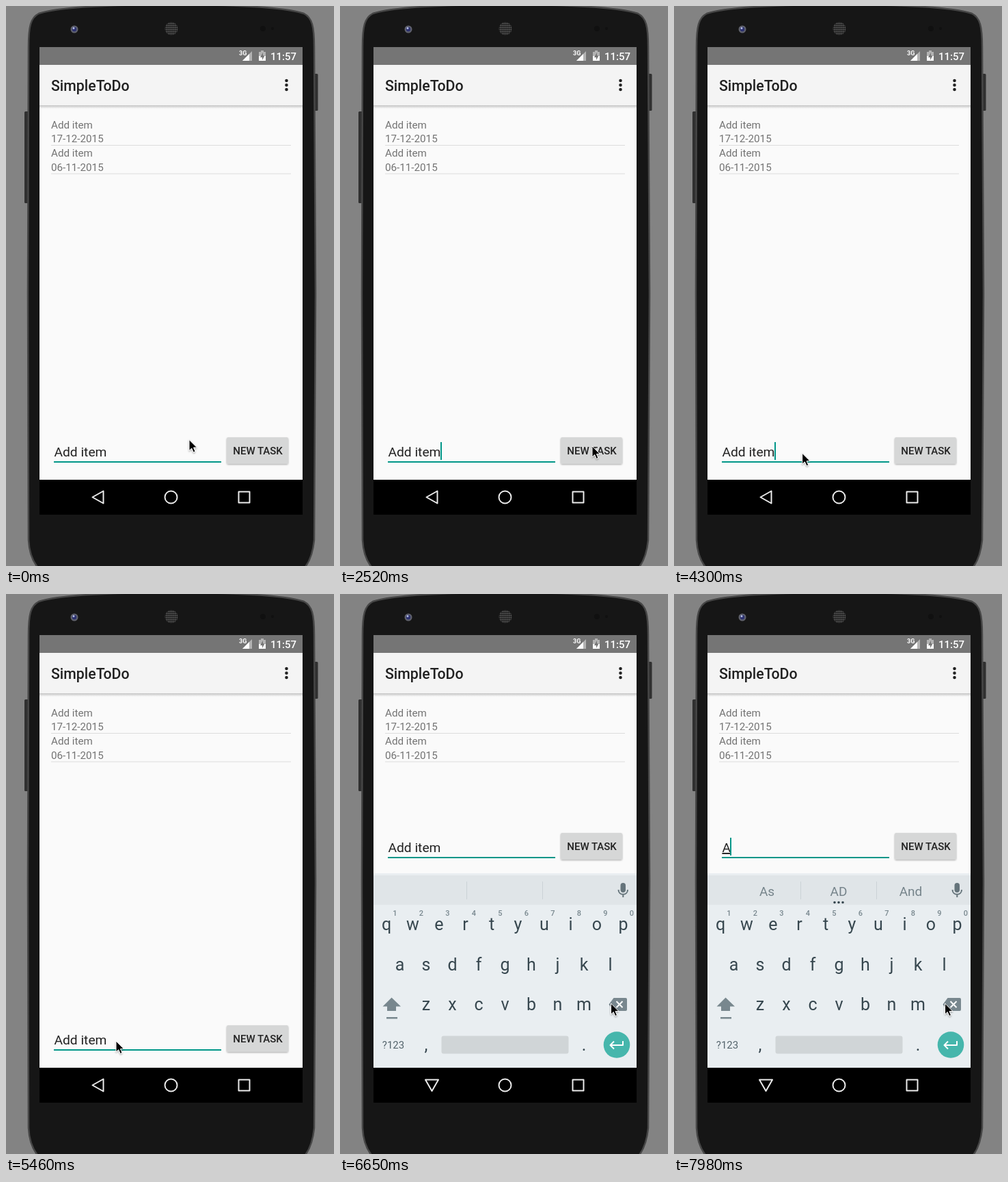
An HTML page for the animation above (8000 ms loop, 480x818 px).

```html
<!DOCTYPE html>
<html lang="en">
<head>
<meta charset="utf-8">
<title>To-do app</title>
<style>
html, body { margin: 0; width: 100%; height: 100%; overflow: hidden; background: #838383; }
svg { display: block; font-family: Roboto, sans-serif; }
text { white-space: pre; }
.medium { font-weight: 500; }
.mid { text-anchor: middle; }
.line { fill: none; stroke-width: 2; stroke-linejoin: round; }
</style>
</head>
<body>
<svg width="480" height="818" viewBox="0 0 480 818">
  <defs>
    <pattern id="mesh" width="3" height="3" patternUnits="userSpaceOnUse">
      <rect width="3" height="3" fill="#1d1d1d"/><circle cx="1.5" cy="1.5" r="1.1" fill="#606060"/>
    </pattern>
    <linearGradient id="fade" x2="0" y2="1">
      <stop stop-color="#c4c4c4"/><stop offset="1" stop-color="#fafafa"/>
    </linearGradient>
    <filter id="soft" x="-30%" y="-30%" width="160%" height="180%">
      <feDropShadow dx="0" dy="1.3" stdDeviation="1" flood-opacity=".35"/>
    </filter>
  </defs>

  <!-- Phone -->
  <rect x="27" y="154" width="7" height="134" rx="1.5" fill="#303030"/>
  <rect x="450" y="99" width="6.5" height="54" rx="1.5" fill="#303030"/>
  <path d="M33 60C33 30 36 17 48 11C70 4 130-2 242-2S414 4 436 11C448 17 451 30 451 60L453 420 451 780C449 800 444 814 434 824H50C40 814 34 800 33 780L32 420Z" fill="#161616" stroke="#464646" stroke-width="2.5"/>
  <circle cx="100" cy="34" r="5.5" fill="#5f616c"/>
  <circle cx="100" cy="34" r="3.2" fill="#2d3270"/>
  <circle cx="99" cy="32.5" r="1.4" fill="#b9c2ea"/>
  <circle cx="242" cy="33" r="9.5" fill="url(#mesh)"/>
  <circle cx="376" cy="33" r="4" fill="#101010"/>
  <circle cx="390" cy="33" r="2" fill="#101010"/>

  <!-- App -->
  <rect x="49" y="60" width="385" height="632" fill="#fafafa"/>
  <rect x="49" y="145" width="385" height="5" fill="url(#fade)"/>
  <rect x="49" y="86" width="385" height="59" fill="#f4f4f4"/>
  <rect x="49" y="60" width="385" height="26" fill="#757575"/>
  <g fill="#fff">
    <text x="341" y="72" font-size="9" font-weight="700">3G</text>
    <path d="M360 66V80H346Z" fill-opacity=".45"/>
    <path d="M356 70V80H346Z"/>
    <path d="M370 67H373V65H377V67H380V80H370Z" fill-opacity=".45"/>
    <path d="M370 73H380V80H370Z"/>
    <path d="M376 68L372 75H375V79L378.5 72.5H376Z" fill="#757575"/>
    <text x="387" y="78.5" font-size="15" class="medium">11:57</text>
  </g>
  <text x="66" y="124" font-size="21.3" class="medium" fill="#212121">SimpleToDo</text>
  <path d="M410.5 109v0m0 6.5v0m0 6.5v0" stroke="#212121" stroke-width="4.6" stroke-linecap="round"/>
  <g font-size="15.2" fill="#737373">
    <text x="66" y="178.5">Add item</text><text x="66" y="199">17-12-2015</text>
    <text x="66" y="220">Add item</text><text x="66" y="240.5">06-11-2015</text>
  </g>
  <path d="M66 203.5H417M66 245H417" stroke="#dcdcdc"/>

  <g id="entry">
    <text id="field" x="70.4" y="658" font-size="19.25" fill="#212121"></text>
    <path d="M70 666H315" stroke="#009688" stroke-width="2"/>
    <rect id="caret" y="637" width="2" height="26" fill="#009688"/>
    <circle id="handle" cx="148" cy="678" r="10.5" fill="#009688" fill-opacity=".35"/>
    <rect x="323" y="630" width="90" height="38.5" rx="2" fill="#d6d7d7" filter="url(#soft)"/>
    <text x="368.5" y="655" font-size="15" class="medium mid" fill="#212121">NEW TASK</text>
  </g>

  <!-- Keyboard -->
  <g id="keyboard">
    <rect x="49" y="408" width="385" height="284" fill="#e9eef1"/>
    <rect x="49" y="411" width="385" height="43" fill="#e0e5e8"/>
    <path d="M185.5 420V446M296.5 420V446" stroke="#cbd2d6"/>
    <g id="hints" font-size="19" class="mid" fill="#75838a">
      <text x="136" y="440.5">As</text><text x="241" y="440.5">AD</text><text x="346.5" y="440.5">And</text>
      <path d="M235 450.5h0m6 0h0m6 0h0" stroke="#37474f" stroke-width="3.6" stroke-linecap="round"/>
    </g>
    <rect x="410.5" y="422" width="7.5" height="14" rx="3.7" fill="#65747b"/>
    <path d="M407.5 432C407.5 441 421 441 421 432M414.3 438.5V443" class="line" stroke="#65747b"/>
    <g id="keys" class="mid" fill="#37474f"></g>
    <text x="78" y="664" font-size="15" class="mid" fill="#54646c">?123</text>
    <rect x="148.5" y="645.5" width="186" height="26" rx="3" fill="#d0d5d7"/>
    <rect id="pressed" x="383" y="578" width="48" height="44" rx="3" fill="#cfd7db"/>
    <path d="M75.5 589.5L89 602.5H82V609H69V602.5H62.5ZM68 618H84V620.5H68Z" fill="#78878e"/>
    <path d="M393.5 599.5L400.5 590H418Q420 590 420 592V607Q420 609 418 609H400.5Z" fill="#78878e"/>
    <path d="M404.5 595L413.5 604M413.5 595L404.5 604" stroke="#fff" stroke-width="2"/>
    <circle cx="405" cy="658.5" r="19.3" fill="#46b6ac"/>
    <path d="M414 653V659H396M401 653.5L395.5 659 401 664.5" class="line" stroke="#fff"/>
  </g>

  <!-- Navigation bar -->
  <rect x="49" y="692" width="385" height="51"/>
  <g class="line" stroke="#ececec">
    <path id="back"/>
    <circle cx="241.5" cy="717.5" r="9"/>
    <rect x="340.5" y="709.5" width="16" height="16"/>
  </g>

  <path id="pointer" d="M0 0V16L3.7 12.6 6.3 18.5 9 17.3 6.5 11.5H11.5Z" stroke="#fff" filter="url(#soft)"/>
</svg>
<script>
const LOOP = 8000, STEP = 147.4, BLINK = 500;
const BUTTON_CLICK = 2850, KEYBOARD_OPEN = 5600, SPACE_TYPED = 5740;
const DELETE_DOWN = 6930, DELETE_REPEAT = 7380, REPEAT_EVERY = 90, DELETE_UP = 7950;
const $ = id => document.getElementById(id);

const pitch = 38.5;
const key = (char, x, y, attrs) => `<text x="${x}" y="${y}" ${attrs}>${char}</text>`;
const keyRow = (chars, x, y, attrs) => [...chars].map((c, i) => key(c, x + i * pitch, y, attrs)).join("");
const rows = { qwertyuiop: 68, asdfghjkl: 87.5, zxcvbnm: 126, ",     .": 126 };
$("keys").innerHTML =
  Object.entries(rows).map(([chars, x], i) => keyRow(chars, x, 491.3 + i * 58.4, 'font-size="25"')).join("") +
  keyRow("1234567890", 80.5, 470, 'font-size="11" class="medium" fill="#78878e"');

// Resting and turning points of the pointer
const path = [
  { t: 590, x: 268, y: 633.5 }, { t: 1180, x: 269, y: 639.5 },
  { t: 1770, x: 269, y: 639.5 }, { t: 2060, x: 276, y: 578 },
  { t: 2650, x: 382, y: 652 }, { t: 3390, x: 368, y: 655 },
  { t: 3840, x: 368, y: 655 }, { t: 4420, x: 161, y: 653 },
  { t: 5750, x: 161, y: 653 }, { t: 6190, x: 456, y: 592 }, { t: 6480, x: 396.5, y: 598 },
];
const ease = p => p * p * (3 - 2 * p);

function pointerAt(t) {
  const next = path.findIndex(point => point.t > t);
  if (next < 1) return path.at(next);
  const a = path[next - 1], b = path[next], p = ease((t - a.t) / (b.t - a.t));
  return { x: a.x + (b.x - a.x) * p, y: a.y + (b.y - a.y) * p };
}

function textAt(t) {
  if (t < SPACE_TYPED) return "Add item";
  const repeats = Math.max(0, Math.floor((t - DELETE_REPEAT) / REPEAT_EVERY) + 1);
  return "Add item ".slice(0, 9 - (t >= DELETE_DOWN) - repeats);
}

// Input restarts the blinking with the caret visible
function caretAt(t) {
  const restart = [-720, BUTTON_CLICK, KEYBOARD_OPEN, SPACE_TYPED, DELETE_DOWN, DELETE_REPEAT].findLast(r => r <= t);
  return t >= DELETE_REPEAT || Math.floor((t - restart) / BLINK) % 2 === 0;
}

const show = (id, on) => $(id).setAttribute("visibility", on ? "visible" : "hidden");

function render(time) {
  // The screen refreshes in even steps
  const t = Math.floor(time / STEP + 0.05) * STEP + 15;
  const { x, y } = pointerAt(t), text = textAt(t), open = t >= KEYBOARD_OPEN;
  const field = $("field");
  $("pointer").setAttribute("transform", `translate(${x} ${y})`);
  $("entry").setAttribute("transform", `translate(0 ${open ? -281 : 0})`);
  $("back").setAttribute("d", open ? "M125 709.5H144L134.5 726Z" : "M142.5 708.5V726.5L126.5 717.5Z");
  field.textContent = text;
  field.setAttribute("text-decoration", text.length < 4 ? "underline" : "none");
  $("caret").setAttribute("x", Math.floor(70 + field.getComputedTextLength()));
  show("caret", caretAt(t));
  show("handle", open && t < SPACE_TYPED + STEP);
  show("keyboard", open);
  show("hints", text.length === 1);
  show("pressed", t >= DELETE_DOWN && t < DELETE_UP);
}

const start = performance.now();
function tick() {
  render((performance.now() - start) % LOOP);
  requestAnimationFrame(tick);
}
tick();
</script>
</body>
</html>
```
